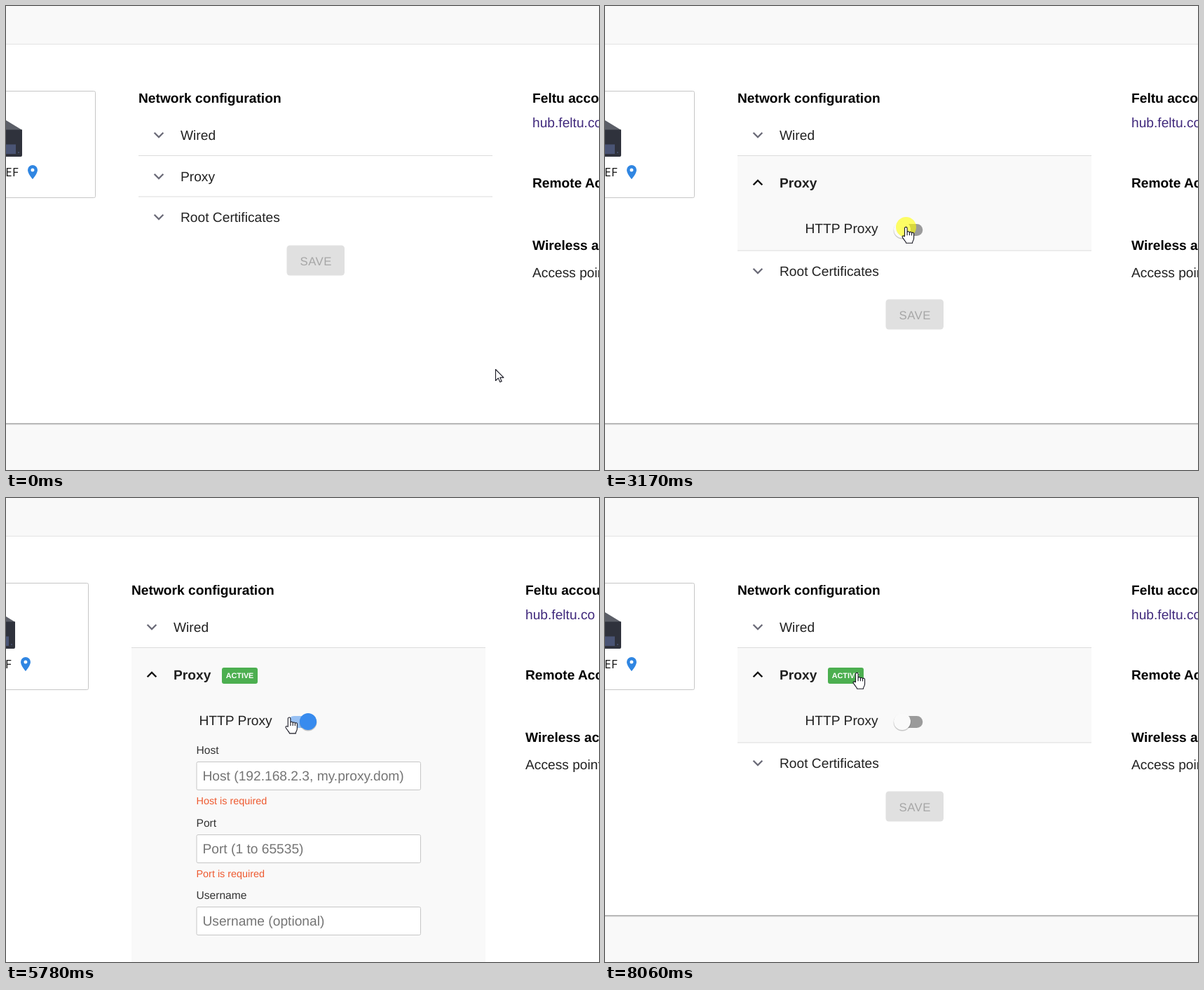
An HTML page that plays this animation: 846x662 px, repeating every 8.14 s.

```html
<!DOCTYPE html>
<html lang="en">
<head>
<meta charset="utf-8">
<title>Network configuration</title>
<style>
  html, body { margin: 0; width: 100%; height: 100%; overflow: hidden; background: #f9f9f9; }
  svg { display: block; width: 846px; height: 662px; }
  text {
    font: 19.2px "Liberation Sans", Arial, sans-serif;
    fill: #212121;
    text-rendering: geometricPrecision;
  }
  .head { font-weight: bold; fill: #000; }
  .link { fill: #40297c; }
  .label { font-size: 15.6px; fill: #333; }
  .hint { fill: #757575; }
  .error { font-size: 14.4px; fill: #ee5a30; }
  .badge { font-size: 10.8px; font-weight: bold; fill: #fff; text-anchor: middle; }
  .save { font-size: 16.8px; letter-spacing: .48px; fill: #a6a6a6; }
  .id { font: 16.8px "Open Sans", "Noto Sans", sans-serif; letter-spacing: .4px; fill: #111; }
  .line { fill: #dcdcdc; }
  .box { fill: #fff; stroke: #c6c6c6; }
  .chevron { fill: #6b6b78; }
  .cursor { fill: #fff; stroke: #171722; stroke-width: 1.1; stroke-linejoin: round; }
</style>
</head>
<body>
<svg viewBox="0 0 846 662">
  <defs>
    <path id="chevron" d="M5.5-4.1 0 1.4-5.5-4.1-7.2-2.4 0 4.8 7.2-2.4z"/>
    <clipPath id="panelClip"><rect id="clipBox" x="189" y="214" width="505"/></clipPath>
  </defs>
  <rect y="54" width="846" height="1" fill="#e3e3e3"/>
  <rect id="card" y="55" width="846" fill="#fff"/>
  <g id="cardEdge">
    <rect y="595" width="846" height="1" fill="#b4b4b4"/>
    <rect y="596" width="846" height="1" fill="#c0c0c0"/>
    <rect y="597" width="846" height="1" fill="#e9e9e9"/>
  </g>

  <g id="page">
    <rect class="box" x="-40" y="121.5" width="167.5" height="152" rx="2"/>
    <path d="M-20 163H0L23 177H-20z" fill="#5b5e67"/>
    <path d="M-20 176.5H23V213q0 2-2 2H-20z" fill="#2f323c"/>
    <path d="M-20 197.5H14V211H-20z" fill="#4a5474"/>
    <circle cx="18" cy="209" r="1" fill="#4a5474"/>
    <text class="id" x="-.8" y="243">EF</text>
    <path transform="translate(26 225)" fill="#3086e2"
      d="M12 2a7 7 0 0 0-7 7c0 5.250 7 13 7 13s7-7.750 7-13a7 7 0 0 0-7-7zm0 9.500a2.500 2.500 0 1 1 0-5 2.500 2.500 0 0 1 0 5z"/>

    <text class="head" x="189" y="138">Network configuration</text>
    <use href="#chevron" class="chevron" x="218" y="184"/>
    <text x="249" y="191">Wired</text>

    <rect id="panel" x="189" y="214" width="505" fill="#f9f9f9"/>
    <rect class="line" x="189" y="213" width="505" height="1"/>
    <use id="arrow" href="#chevron"/>
    <text id="proxy" x="249">Proxy</text>
    <g id="badge">
      <rect x="318" y="242" width="51" height="23" rx="3" fill="#4caf50"/>
      <text class="badge" x="343.5" y="257.3">ACTIVE</text>
    </g>
    <g id="content" clip-path="url(#panelClip)">
      <text x="285.5" y="324">HTTP Proxy</text>
      <rect id="track" x="412.5" y="311" width="40.800" height="17" rx="8.500"/>
      <g id="knob">
        <circle cy="320.2" r="12.6" fill="#000" opacity=".1"/>
        <circle cy="320" r="12.2" fill="#000" opacity=".12"/>
        <circle id="knobFace" cy="319" r="12"/>
      </g>
      <g id="fields"></g>
    </g>

    <g id="below">
      <rect class="line" x="189" y="271.5" width="505" height="1"/>
      <use href="#chevron" class="chevron" x="218" y="301"/>
      <text x="249" y="308">Root Certificates</text>
      <rect x="400.5" y="341.5" width="82.5" height="43" rx="4.5" fill="#e0e0e0"/>
      <text class="save" x="419.5" y="369.5">SAVE</text>
    </g>

    <text class="head" x="751" y="138">Feltu account</text>
    <text class="link" x="751" y="173">hub.feltu.co</text>
    <text class="head" x="751" y="259">Remote Access</text>
    <text class="head" x="751" y="348">Wireless access point</text>
    <text x="751" y="387">Access point</text>
  </g>

  <g id="mouse">
    <circle id="halo" r="14.5" fill="#ff0" opacity=".6"/>
    <path id="pointer" class="cursor" d="M0 0V16L3.8 12.4 6.3 18 8.7 17 6.3 11.6H11.5z"/>
    <path id="hand" class="cursor" d="M-2 13.200V1.700a1.800 1.800 0 0 1 3.600 0V7.300a1.700 1.700 0 0 1 3.300.5a1.700 1.700 0 0 1 3.200.7a1.600 1.600 0 0 1 3 .9V15.500q0 2.500-1.200 4.300t-.8 3H.2q-.4-1.800-2-3.400l-3.200-4.500c-1.200-1.800.8-3.200 2-2zM1.600 7.300v4.500M4.900 7.800v4M8.100 8.500v3.500"/>
  </g>
</svg>
<script>
const LOOP = 8140;
const ENABLE = 3400, DISABLE = 6470;
const $ = id => document.getElementById(id);
const set = (id, attrs) => {
  for (const k in attrs) $(id).setAttribute(k, attrs[k]);
};
const show = (id, on) => set(id, { visibility: on ? 'visible' : 'hidden' });
const place = (id, x, y) => set(id, { transform: `translate(${x} ${y})` });

const clamp = v => Math.min(1, Math.max(0, v));
const ease = p => (1 - Math.cos(Math.PI * clamp(p))) / 2;
const mix = (a, b, p) => a.map((v, i) => v + (b[i] - v) * p);

// Progress in n even jumps, the first at start and the last at end
function steps(t, start, end, n) {
  if (t < start) return 0;
  const jump = Math.floor((t - start) / (end - start) * (n - 1) + .25);
  return clamp((jump + 1) / n);
}

const rest = [698.5, 518.5];
const header = [312.5, 239.5];
const knob = [429.5, 315.5];
const knobEdge = [436.5, 318.5];
const wide = { x: 334, y: 239, rx: 36, ry: 28 };
const small = { x: 336, y: 248, rx: 30, ry: 19 };

// Clockwise around a ring, starting at its left
function onRing(ring, turns) {
  const a = Math.PI * (1 + 2 * turns);
  return [ring.x + ring.rx * Math.cos(a), ring.y + ring.ry * Math.sin(a)];
}

function glide(from, to, bend = 0) {
  return p => {
    const [x, y] = mix(from, to, ease(p));
    const sag = bend * Math.sin(Math.PI * p);
    return [x - sag, y + sag];
  };
}

// Go to a ring, then circle along it
function circle(from, ring, turns) {
  const reach = .45;
  return p => p < reach
    ? mix(from, onRing(ring, 0), ease(p / reach))
    : onRing(ring, turns * (p - reach) / (1 - reach));
}

const moves = [
  { start: 750, end: 1540, n: 11, path: glide(rest, header) },
  { start: 2550, end: 2930, n: 6, path: glide(header, knob) },
  { start: 4350, end: 5140, n: 11, path: circle(knob, wide, 1) },
  { start: 5210, end: 6010, n: 11, path: glide(onRing(wide, 0), knobEdge, 11) },
  { start: 7020, end: 7820, n: 11, path: circle(knobEdge, small, .8) },
  { start: 7910, end: 8060, n: 3, path: glide(onRing(small, .8), [359.5, 249.5]) }
];
const clicks = [[1770, 2000], [3170, ENABLE], [6240, DISABLE]];

function mouseAt(t) {
  const move = moves.filter(m => m.start <= t).pop();
  return move ? move.path(steps(t, move.start, move.end, move.n)) : rest;
}

function buildFields() {
  const rows = [
    ['Host', 'Host (192.168.2.3, my.proxy.dom)', 'Host is required'],
    ['Port', 'Port (1 to 65535)', 'Port is required'],
    ['Username', 'Username (optional)', '']
  ];
  $('fields').innerHTML = rows.map(([label, hint, error], i) => {
    const y = Math.ceil(376 + 103.2 * i) + .5;
    return `<text class="label" x="281.5" y="${y - 11.5}">${label}</text>
      <rect class="box" x="282" y="${y}" width="319.5" height="40" rx="2"/>
      <text class="hint" x="290.5" y="${y + 26.5}">${hint}</text>
      <text class="error" x="281.5" y="${y + 60}">${error}</text>`;
  }).join('');
}

function drawPanel(t, on) {
  const p = steps(t, 2000, 2250, 4);
  const open = p > 0;
  const grow = 77 * ease(p) ** 1.8;
  const drop = 9 * ease(p) ** 1.5;
  const height = on ? 448 : 57.5 + grow;

  place('below', 0, grow);
  set('panel', { height });
  set('clipBox', { height });
  show('panel', open);
  show('content', open);
  set('proxy', { y: 250 + drop });
  $('proxy').style.fontWeight = open ? 'bold' : 'normal';
  set('arrow', {
    transform: `translate(218 ${243 + drop}) rotate(${180 * p})`,
    fill: open ? '#111' : '#6b6b78'
  });
}

function drawSwitch(t, on) {
  const pos = ease(steps(t, ENABLE + 80, 3640, 3)) - ease(steps(t, DISABLE + 80, 6640, 2));
  set('track', { fill: `rgb(${mix([155, 155, 155], [152, 193, 244], pos)})` });
  place('knob', 424 + 17 * pos, 0);
  set('knobFace', { fill: on ? '#388bee' : '#fafafa' });
}

function drawMouse(t) {
  const [x, y] = mouseAt(t);
  const overRow = x > 189 && x < 694 && y < 330;
  place('mouse', x, y);
  show('hand', overRow);
  show('pointer', !overRow);
  show('halo', clicks.some(([down, up]) => t >= down && t < up));
}

function draw(t) {
  const on = t >= ENABLE && t < DISABLE;
  place('page', on ? -10 : 0, 0);
  set('card', { height: on ? 607 : 540 });
  show('cardEdge', !on);
  show('below', !on);
  show('fields', on);
  show('badge', t >= ENABLE);
  drawPanel(t, on);
  drawSwitch(t, on);
  drawMouse(t);
}

buildFields();
const begin = performance.now();
function tick() {
  draw((performance.now() - begin) % LOOP);
  requestAnimationFrame(tick);
}
tick();
</script>
</body>
</html>
```
